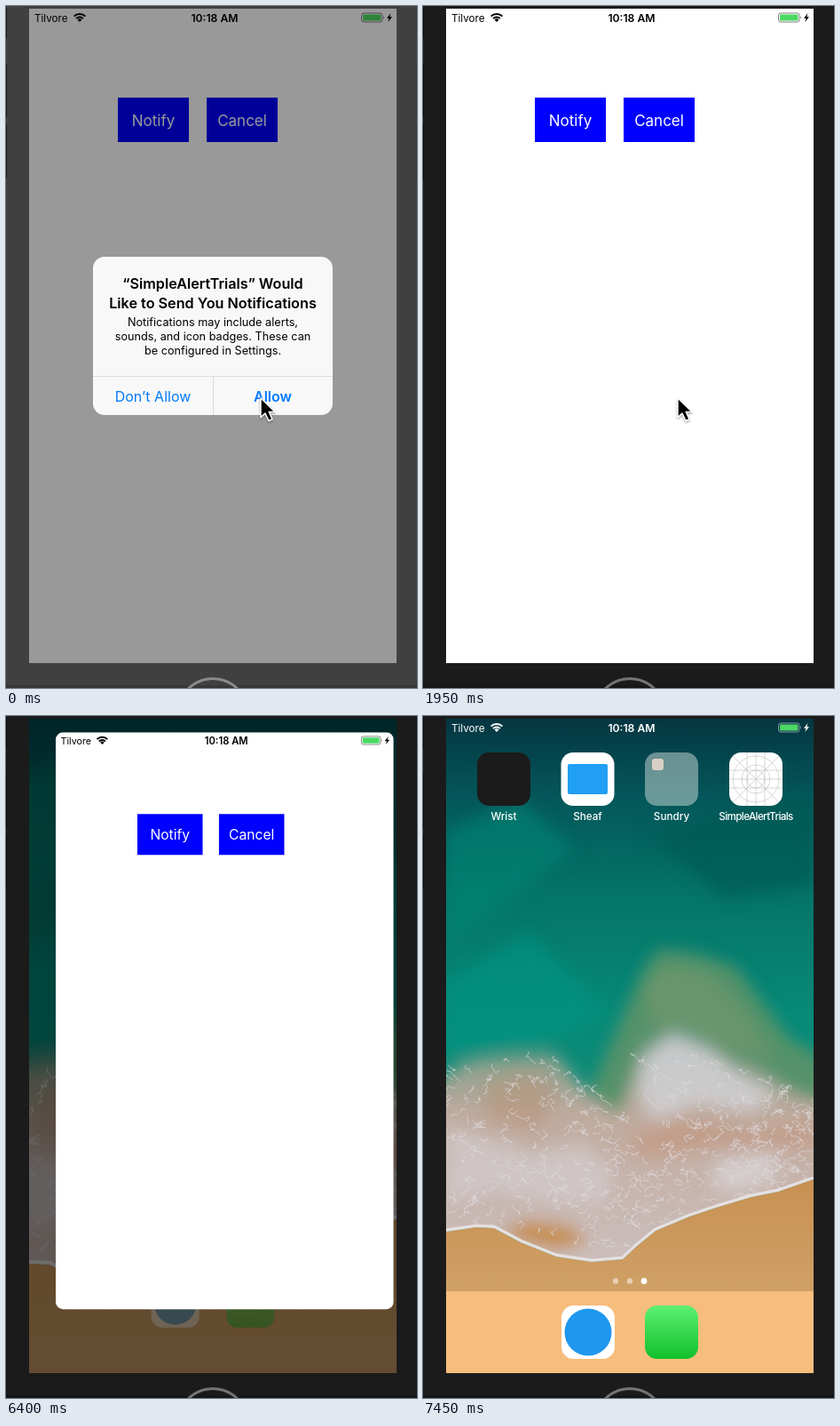
Write an HTML page that moves like this. It is 463 px wide and 767 px high and loops after 8 s.

```html
<!DOCTYPE html>
<html lang="en">
<head>
<meta charset="utf-8">
<title>Notification permission</title>
<style>
  html, body { margin: 0; width: 100%; height: 100%; overflow: hidden; background: #1b1b1b; }
  svg { display: block; width: 100%; height: 100%; font-family: Inter, "Liberation Sans", sans-serif; }
  .mid { text-anchor: middle; }
  .bold { font-weight: 600; }
  .btn { font-size: 17px; fill: #fff; }
  .title { font-size: 16.2px; }
  .body { font-size: 12.7px; }
  .link { font-size: 16px; fill: #007aff; }
  .label { font-size: 11.7px; font-weight: 500; fill: #fff; }
</style>
</head>
<body>
<svg viewBox="0 0 463 767">
  <defs>
    <clipPath id="screenClip"><rect x="26" y="3" width="414" height="736"/></clipPath>
    <clipPath id="appClip"><rect id="appShape" width="414" height="736"/></clipPath>
    <clipPath id="waterClip">
      <path d="M0 0H463V514L440 521L400 535L370 541L330 553L300 563L262 579L240 597L225 611L190 614L150 608L110 592L80 576L60 575L26 580L0 584Z"/>
    </clipPath>

    <linearGradient id="sea" x1="0" y1="0" x2="0" y2="1">
      <stop offset="0" stop-color="#053641"/>
      <stop offset=".14" stop-color="#04565a"/>
      <stop offset=".32" stop-color="#047468"/>
      <stop offset=".55" stop-color="#078a79"/>
      <stop offset="1" stop-color="#279078"/>
    </linearGradient>
    <linearGradient id="sand" x1="0" y1="500" x2="0" y2="647" gradientUnits="userSpaceOnUse">
      <stop offset="0" stop-color="#c68e4e"/>
      <stop offset="1" stop-color="#d0a066"/>
    </linearGradient>
    <linearGradient id="foam" x1="0" y1="360" x2="0" y2="600" gradientUnits="userSpaceOnUse">
      <stop offset="0" stop-color="#689a82"/>
      <stop offset=".14" stop-color="#8ea18d"/>
      <stop offset=".36" stop-color="#bfaa9d"/>
      <stop offset=".65" stop-color="#c6b2a9"/>
      <stop offset="1" stop-color="#cabdbb"/>
    </linearGradient>
    <linearGradient id="green" x1="0" y1="0" x2="0" y2="1">
      <stop offset="0" stop-color="#5df072"/>
      <stop offset="1" stop-color="#10c02a"/>
    </linearGradient>
    <filter id="soft" x="-20%" y="-20%" width="140%" height="140%"><feGaussianBlur stdDeviation="9"/></filter>
    <filter id="shade" x="-50%" y="-50%" width="220%" height="220%">
      <feDropShadow dx="0" dy="1.5" stdDeviation="1.2" flood-opacity=".4"/>
    </filter>

    <g id="status" fill="currentColor">
      <text x="6" y="14.6" font-size="11.7">Tilvore</text>
      <path d="M50.6 8.6A9 9 0 0 1 63.4 8.6M53.1 11.1A5.5 5.5 0 0 1 60.9 11.1" fill="none" stroke="currentColor" stroke-width="2"/>
      <path d="M57 15L54.5 12.5A3.5 3.5 0 0 1 59.5 12.5Z"/>
      <text class="mid bold" x="209" y="14.8" font-size="12.2">10:18 AM</text>
      <rect x="374.5" y="5" width="23.5" height="10" rx="2.5" fill="none" stroke="currentColor" stroke-opacity=".5"/>
      <rect x="376" y="6.5" width="20.5" height="7" rx="1" fill="#4cd964"/>
      <path d="M399 8.2q1.6 1.8 0 3.6z" opacity=".6"/>
      <path d="M407.5 5L403 10.7H405.6L404.3 15L409 9.2H406.3Z"/>
    </g>

    <g id="grid">
      <rect width="60" height="60" rx="13.5" fill="#fff"/>
      <g fill="none" stroke="#bdbdbd" stroke-width=".6">
        <circle cx="30" cy="30" r="26"/><circle cx="30" cy="30" r="16"/><circle cx="30" cy="30" r="10"/>
        <path d="M4 4L56 56M56 4L4 56M30 0V60M0 30H60M20 0V60M40 0V60M0 20H60M0 40H60"/>
      </g>
    </g>

    <g id="arrow" filter="url(#shade)">
      <path d="M0 0V21.5L5 17L9 25.5L13 23.7L9.2 15.4H16Z" fill="#000" stroke="#fff" stroke-width="1.4" stroke-linejoin="round"/>
    </g>
  </defs>

  <g id="bezel">
    <rect id="frame" width="463" height="767"/>
    <rect y="764" width="463" height="3" fill="#000" opacity=".15"/>
    <path d="M0 2H.5V35.5H0M0 65.5H.5V124.5H0M0 133.5H.5V193.5H0" fill="none" stroke="#000" stroke-opacity=".6"/>
    <circle id="ring" cx="233" cy="796" r="39.5" fill="none" stroke-width="3"/>
  </g>

  <g clip-path="url(#screenClip)">
    <g id="home">
      <g id="wall">
        <rect x="26" y="3" width="414" height="736" fill="url(#sand)"/>
        <g clip-path="url(#waterClip)">
          <rect x="26" y="3" width="414" height="612" fill="url(#sea)"/>
          <g filter="url(#soft)">
            <path d="M250 130L440 85V190L340 205Z" fill="#035a55" opacity=".7"/>
            <path d="M26 130L110 95L170 150L60 235L26 250Z" fill="#0a8576" opacity=".6"/>
            <path d="M26 300L120 245L205 330L130 372L26 385Z" fill="#0a9584" opacity=".6"/>
            <path d="M190 420L222 345L245 292L265 262L310 268L352 282L382 322L412 362L460 392V450H205Z" fill="#559269"/>
            <path d="M250 305L275 283L318 292L352 322L395 385L330 372L262 352Z" fill="#79986f" opacity=".6"/>
            <path d="M0 425L45 390L80 383L120 380L150 380L172 410L200 436L222 448L236 400L248 368L275 353L300 350L322 364L346 384L380 398L410 420L470 444V640H0Z" fill="url(#foam)"/>
            <path d="M248 385L280 358L322 376L355 402L398 425L372 445L310 436L262 455L242 425Z" fill="#d3d0d5" opacity=".85"/>
            <path d="M70 412L128 398L152 430L125 470L72 452Z" fill="#b8977e" opacity=".6"/>
            <path d="M225 475L290 452L368 465L440 455V488L350 482L250 500Z" fill="#c39880" opacity=".65"/>
            <path d="M26 460L70 475L125 492L180 480L215 512L205 550L140 545L80 535L26 545Z" fill="#d3cdd0" opacity=".7"/>
            <path d="M330 500L395 490L400 518L360 535L325 530Z" fill="#dbd7da" opacity=".7"/>
            <path d="M85 580L120 568L165 574L188 592L150 600L112 592Z" fill="#c68d48"/>
          </g>
          <g id="veins" fill="none" stroke="#e0dde2" stroke-linecap="round" opacity=".6"></g>
          <path d="M440 520L400 534L370 540L330 552L300 562L262 578L240 596L225 610L190 613L150 607L110 591L80 575L60 574L26 579" fill="none" stroke="#e6e0e0" stroke-width="5" stroke-linejoin="round"/>
        </g>
      </g>
      <rect id="dock" x="26" y="647" width="414" height="92" fill="#f6bd7c"/>
      <g id="overlay" fill="#fff">
        <use href="#status" x="26" y="3" color="#fff"/>
        <circle cx="217" cy="635.5" r="3.2" opacity=".5"/>
        <circle cx="233" cy="635.5" r="3.2" opacity=".5"/>
        <circle cx="249" cy="635.5" r="3.4"/>
      </g>
      <g id="icons">
        <rect x="61" y="41" width="60" height="60" rx="13.5" fill="#1b1b1b"/>
        <rect x="155.5" y="41" width="60" height="60" rx="13.5" fill="#fff"/>
        <rect x="163" y="54" width="45" height="34" rx="2" fill="#219ff5"/>
        <rect x="250" y="41" width="60" height="60" rx="13.5" fill="#d0dcda" opacity=".5"/>
        <rect x="258" y="48" width="13" height="13" rx="3" fill="#d8d0c4"/>
        <use id="gridIcon" href="#grid" x="345" y="41"/>
        <g class="label mid">
          <text x="91" y="117">Wrist</text>
          <text x="185.5" y="117">Sheaf</text>
          <text x="280" y="117">Sundry</text>
          <text x="375" y="117" letter-spacing="-.65">SimpleAlertTrials</text>
        </g>
        <rect x="156" y="663" width="60" height="60" rx="13.5" fill="#fff"/>
        <circle cx="186" cy="693" r="26.5" fill="#1f97ee"/>
        <rect x="250" y="663" width="60" height="60" rx="13.5" fill="url(#green)"/>
      </g>
      <rect id="dusk" x="26" y="3" width="414" height="736" fill="#000"/>
    </g>

    <use id="flyIcon" href="#grid"/>
    <g id="app">
      <g clip-path="url(#appClip)">
        <rect width="414" height="736" fill="#fff"/>
        <use href="#status" color="#000"/>
        <rect x="100" y="100" width="80" height="50" fill="#00f"/>
        <rect x="200" y="100" width="80" height="50" fill="#00f"/>
        <text class="btn mid" x="140" y="131.5">Notify</text>
        <text class="btn mid" x="240" y="131.5">Cancel</text>
      </g>
    </g>

    <rect id="dim" x="26" y="3" width="414" height="736" fill="#000"/>
    <rect id="card" x="98" y="282" width="270" height="178" rx="13" fill="#f8f8f8"/>
    <g id="words" class="mid">
      <text class="title bold" x="233" y="318">“SimpleAlertTrials” Would</text>
      <text class="title bold" x="233" y="340">Like to Send You Notifications</text>
      <text class="body" x="233" y="360">Notifications may include alerts,</text>
      <text class="body" x="233" y="376">sounds, and icon badges. These can</text>
      <text class="body" x="233" y="392">be configured in Settings.</text>
      <path d="M98 416.5H368M233.5 417V460" stroke="#dcdcdc"/>
      <text class="link" x="165.5" y="444.8">Don’t Allow</text>
      <text class="link bold" x="300.5" y="444.8">Allow</text>
    </g>
  </g>

  <use id="arrowA" href="#arrow"/>
  <use id="arrowB" href="#arrow"/>
</svg>

<script>
const LOOP = 8000;
const $ = id => document.getElementById(id);
const set = (id, attrs) => {
  for (const k in attrs) $(id).setAttribute(k, attrs[k]);
};
const show = (id, on) => { $(id).style.display = on ? '' : 'none'; };
const mix = (a, b, p) => a + (b - a) * p;
const about = s => `translate(233 371) scale(${s}) translate(-233 -371)`;

// time, pointer tip, optional trailing tip
const pointer = [
  [0, [287, 441]],
  [2390, [277, 357], [289, 399]],
  [2540, [220, 273], [238, 288]],
  [2690, [158, 175], [161, 193]],
  [2830, [158, 149]],
  [2980, [160, 135]],
  [3130, [161, 131]],
  [3270, [161, 132]],
  [3570, [161, 145], [162, 134]],
  [3710, [207, 448], [209, 395]],
  [3860, [217, 588], [218, 567]],
  [4010, [218, 749]],
  [4150]
];

// time, screen dim, card opacity, text opacity
const alertSteps = [[0, .4, 1, 1], [1800, .118, .52, .29], [1950, 0, 0, 0]];

// time, shrink progress, app opacity, wallpaper scale, icon scale, dusk, home controls opacity
const closing = [
  [0, 0, 1, 1.2, .9, .52, 0],
  [6400, .094, 1, 1.2, .9, .52, 0],
  [6550, .55, .75, 1.11, .95, .24, .6],
  [6700, .89, .15, 1.05, .985, 0, 1],
  [6850, 1, 0, 1.02, 1, 0, 1],
  [7000, 1, 0, 1.012, 1, 0, 1],
  [7150, 1, 0, 1.007, 1, 0, 1],
  [7300, 1, 0, 1.003, 1, 0, 1],
  [7450, 1, 0, 1, 1, 0, 1]
];

const stepAt = (rows, t) => rows.reduce((hit, row) => row[0] <= t ? row : hit);

// Short seeded foam threads, following the slope of the wave.
function drawVeins() {
  let seed = 7;
  const rnd = () => (seed = seed * 16807 % 2147483647) / 2147483647;
  const jit = n => ((rnd() - .5) * n).toFixed(1);
  let d = '';
  for (let i = 0; i < 420; i++) {
    const x = 26 + rnd() * 414;
    const top = x < 235 ? 385 + Math.max(0, x - 150) * .8 : 355 + (x - 245) * .38;
    const end = x < 225 ? 572 + Math.max(0, x - 80) * .2 : 596 - (x - 225) * .37;
    const y = mix(top, end, rnd());
    d += `M${x.toFixed(1)} ${y.toFixed(1)}`;
    for (let k = 0; k < 3; k++) d += `q${jit(10)} ${jit(8)} ${jit(15)} ${jit(13)}`;
  }
  const path = document.createElementNS('http://www.w3.org/2000/svg', 'path');
  path.setAttribute('d', d);
  $('veins').append(path);
}

function drawPointer(t) {
  const [, tip, trail] = stepAt(pointer, t);
  show('arrowA', tip);
  show('arrowB', trail);
  if (tip) set('arrowA', { x: tip[0], y: tip[1], opacity: trail ? .6 : 1 });
  if (trail) set('arrowB', { x: trail[0], y: trail[1], opacity: .6 });
}

function drawAlert(t) {
  const [, dim, card, words] = stepAt(alertSteps, t);
  set('dim', { opacity: dim });
  set('card', { opacity: card });
  set('words', { opacity: words });
  const active = t >= 1500;
  set('frame', { fill: active ? '#1b1b1b' : '#404040' });
  set('ring', { stroke: active ? '#747474' : '#8a8a8a' });
}

function drawClosing(t) {
  const [, p, opacity, wall, icons, dusk, controls] = stepAt(closing, t);
  const s = mix(1, 60 / 414, p);
  const h = mix(736, 414, p);
  const cx = mix(233, 375, p), cy = mix(371, 71, p);
  const flying = p > .1 && p < 1;

  show('home', p > 0);
  show('app', opacity > 0);
  show('flyIcon', flying);
  show('gridIcon', p === 1);

  set('app', { opacity, transform: `translate(${cx - 207 * s} ${cy - h * s / 2}) scale(${s})` });
  set('appShape', { height: h, rx: p ? mix(8, 13.5, p) / s : 0 });
  set('flyIcon', { transform: `translate(${cx} ${cy}) scale(${s * 6.9}) translate(-30 -30)` });
  set('wall', { transform: about(wall) });
  set('icons', { transform: about(icons), opacity: mix(.5, 1, controls) });
  set('dusk', { opacity: dusk });
  set('dock', { opacity: controls });
  set('overlay', { opacity: controls });
}

const start = performance.now();
function tick() {
  const t = (performance.now() - start) % LOOP;
  drawAlert(t);
  drawClosing(t);
  drawPointer(t);
  requestAnimationFrame(tick);
}

drawVeins();
tick();
</script>
</body>
</html>
```
